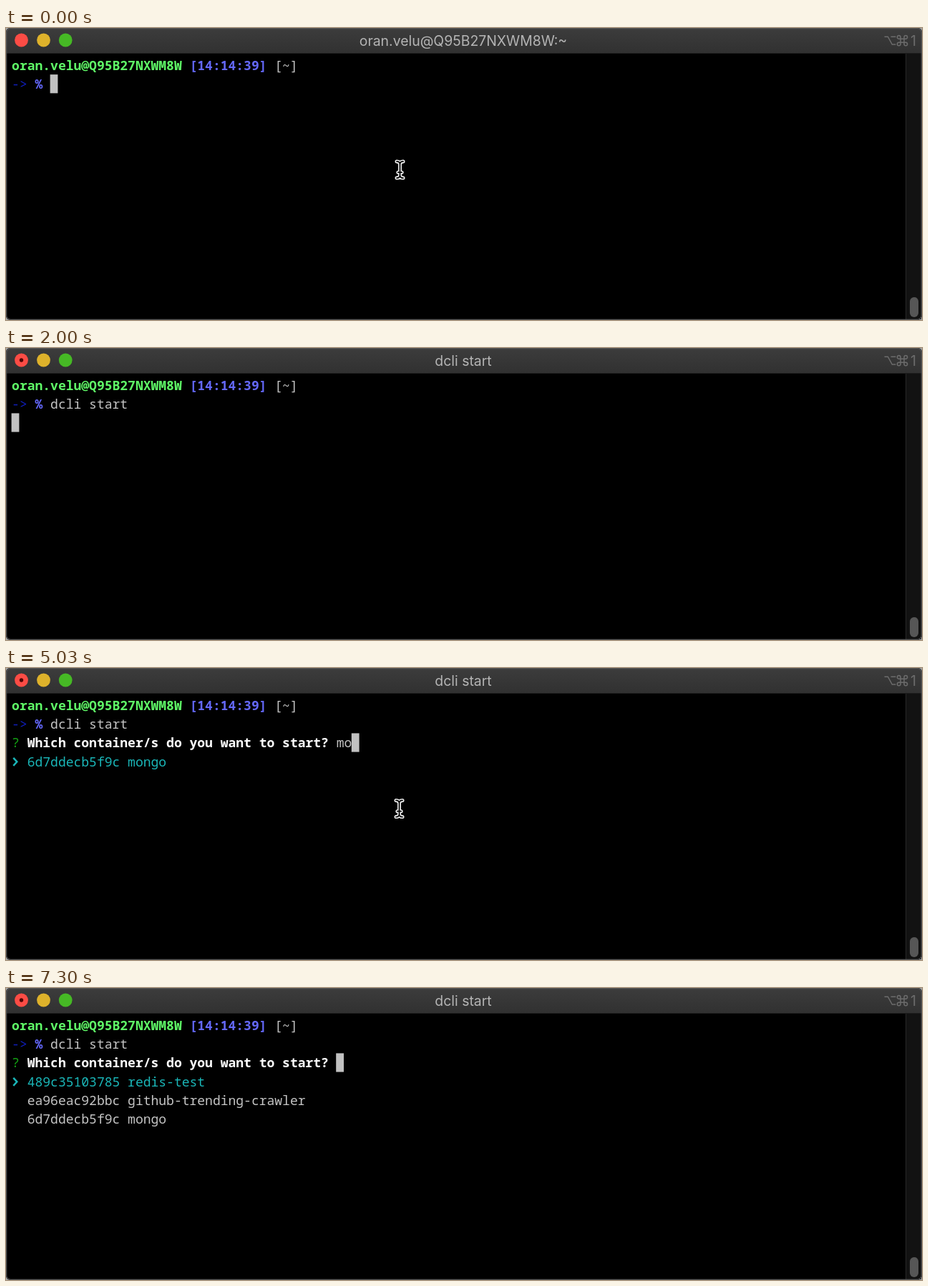
An HTML page for the animation above (8 s loop, 1280 by 409 pixels).

```html
<!DOCTYPE html>
<html lang="en">
<head>
<meta charset="utf-8">
<title>Terminal</title>
<style>
html, body { margin: 0; width: 100%; height: 100%; overflow: hidden; background: #000; }
svg { display: block; width: 100vw; height: 100vh; }
text { white-space: pre; }
#screen { font: 18px "Noto Sans Mono", "DejaVu Sans Mono", monospace; fill: #c4c4c4; }
.bold { font-weight: 600; }
.user { fill: #5ff967; }
.clock { fill: #6468fb; }
.arrow { fill: #101fc0; font-weight: 500; }
.mark { fill: #13a313; }
.ask { fill: #fff; }
.hint { fill: #5c5c5c; }
.pick { fill: #1ab6b8; }
.bar { font: 19.4px Inter, "Open Sans", sans-serif; fill: #b4b4b4; }
.keys { fill: none; stroke: #6c6c6c; stroke-width: 1.5; }
</style>
</head>
<body>
<svg viewBox="0 0 1280 409" preserveAspectRatio="none">
  <defs>
    <linearGradient id="chrome" x2="0" y2="1">
      <stop stop-color="#3c3c3c"/><stop offset="1" stop-color="#313131"/>
    </linearGradient>
    <path id="beam" d="M-4.5 -11.6Q0 -11.6 0 -7.5Q0 -11.6 4.5 -11.6M0 -7.5V7.5M-4.5 11.6Q0 11.6 0 7.5Q0 11.6 4.5 11.6M-2.6 3.7H2.6"/>
  </defs>
  <rect width="1280" height="409" fill="#aaa"/>
  <rect width="1280" height="409" rx="6"/>
  <path d="M0 35V6Q0 0 6 0H1274Q1280 0 1280 6V35Z" fill="url(#chrome)"/>
  <path d="M0 35.5H1280" stroke="#1c1c1c"/>
  <rect x="1257" y="36" width="22" height="372" fill="#121212"/>
  <path d="M1257.5 36V408" stroke="#292929"/>
  <rect x="1263" y="377" width="12" height="28" rx="6" fill="#565656"/>
  <rect x=".7" y=".7" width="1278.6" height="407.6" rx="5.5" fill="none" stroke="#555" stroke-width="1.2"/>
  <circle cx="21.5" cy="17" r="9.4" fill="#fc4c45"/>
  <circle cx="52.5" cy="17" r="9.4" fill="#deb22b"/>
  <circle cx="83.2" cy="17" r="9.4" fill="#46b925"/>
  <circle id="dirty" cx="21.5" cy="17" r="2.7" fill="#4d0503"/>
  <text id="title" class="bar" x="639" y="24.5" text-anchor="middle"></text>
  <g class="keys">
    <path d="M1227.5 12.2h4.8l6 10.8h5M1236.5 12.2h6.8"/>
    <path d="M1250 15.2h5v5h-5zM1250 15.2h-2.3a2.3 2.3 0 1 1 2.3-2.3zM1255 15.2v-2.3a2.3 2.3 0 1 1 2.3 2.3zM1255 20.2h2.3a2.3 2.3 0 1 1-2.3 2.3zM1250 20.2v2.3a2.3 2.3 0 1 1-2.3-2.3z"/>
  </g>
  <text class="bar" x="1264" y="24.5" style="fill:#6c6c6c">1</text>
  <g id="screen"></g>
  <g id="mouse" fill="none" stroke-linecap="round" stroke-linejoin="round">
    <use href="#beam" stroke="#f2f2f2" stroke-width="5"/>
    <use href="#beam" stroke="#000" stroke-width="1.8"/>
  </g>
</svg>
<script>
const LOOP = 8000, CELL = 10.8, LEFT = 7.6, TOP = 38.9, LINE = 26.25;
const HOST = "oran.velu@Q95B27NXWM8W";
const QUESTION = "Which container/s do you want to start?";
const HINT = "(Use arrow keys or type to search)";
const ITEMS = [
  "489c35103785 redis-test",
  "ea96eac92bbc github-trending-crawler",
  "6d7ddecb5f9c mongo"
];

// Each step changes part of the state at a given time.
const STEPS = [
  [0, { cmd: "", query: null, hint: false, run: false, dirty: false, mouse: [550.5, 198.5] }],
  [330, { cmd: "d", mouse: null }],
  [430, { cmd: "dc" }],
  [530, { cmd: "dcl" }],
  [630, { cmd: "dcli" }],
  [770, { cmd: "dcli " }],
  [1000, { cmd: "dcli s" }],
  [1130, { cmd: "dcli st" }],
  [1230, { cmd: "dcli sta" }],
  [1330, { cmd: "dcli star" }],
  [1430, { cmd: "dcli start" }],
  [1600, { run: true }],
  [2000, { dirty: true }],
  [3430, { query: "", hint: true }],
  [4570, { query: "m", hint: false }],
  [4700, { query: "mo" }],
  [4930, { mouse: [549.5, 197] }],
  [5270, { query: "m", mouse: null }],
  [5400, { query: "" }],
  [6070, { query: "t" }],
  [6530, { query: "te" }],
  [6670, { query: "tes" }],
  [7000, { query: "te" }],
  [7130, { query: "t" }],
  [7270, { query: "" }]
];

const el = id => document.getElementById(id);
const x = col => LEFT + col * CELL;
const y = row => TOP + row * LINE;
const put = (col, row, str, cls = "") =>
  `<text x="${x(col) + 0.5}" y="${y(row) + 19.9}" class="${cls}">${str.replace(/>/g, "&gt;")}</text>`;
const block = (col, row) =>
  `<rect x="${x(col)}" y="${y(row)}" width="10.8" height="26.2" fill="#c1c1c1"/>`;
const chevron = row =>
  `<path d="M10.3 ${y(row) + 8.2}L15.3 ${y(row) + 13.7}L10.3 ${y(row) + 19.2}" fill="none" stroke="#1ab6b8" stroke-width="2.5"/>`;

// True when the letters of the query occur in order.
function fuzzy(query, name) {
  let at = 0;
  for (const c of name) if (c === query[at]) at++;
  return at >= query.length;
}

function screen(s) {
  let out = put(0, 0, HOST, "bold user") + put(23, 0, "[14:14:39]", "bold clock") + put(34, 0, "[~]")
    + put(0, 1, "->", "arrow") + put(3, 1, "%", "bold clock") + put(5, 1, s.cmd);
  if (!s.run) return out + block(5 + s.cmd.length, 1);
  if (s.query === null) return out + block(0, 2);
  const typed = s.hint ? HINT : s.query;
  out += put(0, 2, "?", "mark") + put(2, 2, QUESTION, "bold ask")
    + put(42, 2, typed, s.hint ? "hint" : "") + block(42 + typed.length, 2) + chevron(3);
  ITEMS.filter(item => fuzzy(s.query, item.split(" ")[1]))
    .forEach((item, i) => { out += put(2, 3 + i, item, i ? "" : "pick"); });
  return out;
}

let shown = -1;
function draw(now) {
  const t = now % LOOP;
  const n = STEPS.filter(step => step[0] <= t).length;
  if (n === shown) return;
  shown = n;
  const s = Object.assign({}, ...STEPS.slice(0, n).map(step => step[1]));
  el("screen").innerHTML = screen(s);
  el("title").textContent = s.run ? "dcli start" : HOST + ":~";
  el("dirty").style.display = s.dirty ? "" : "none";
  el("mouse").style.display = s.mouse ? "" : "none";
  if (s.mouse) el("mouse").setAttribute("transform", `translate(${s.mouse})`);
}

const start = performance.now();
function tick() {
  draw(performance.now() - start);
  requestAnimationFrame(tick);
}
tick();
</script>
</body>
</html>
```
